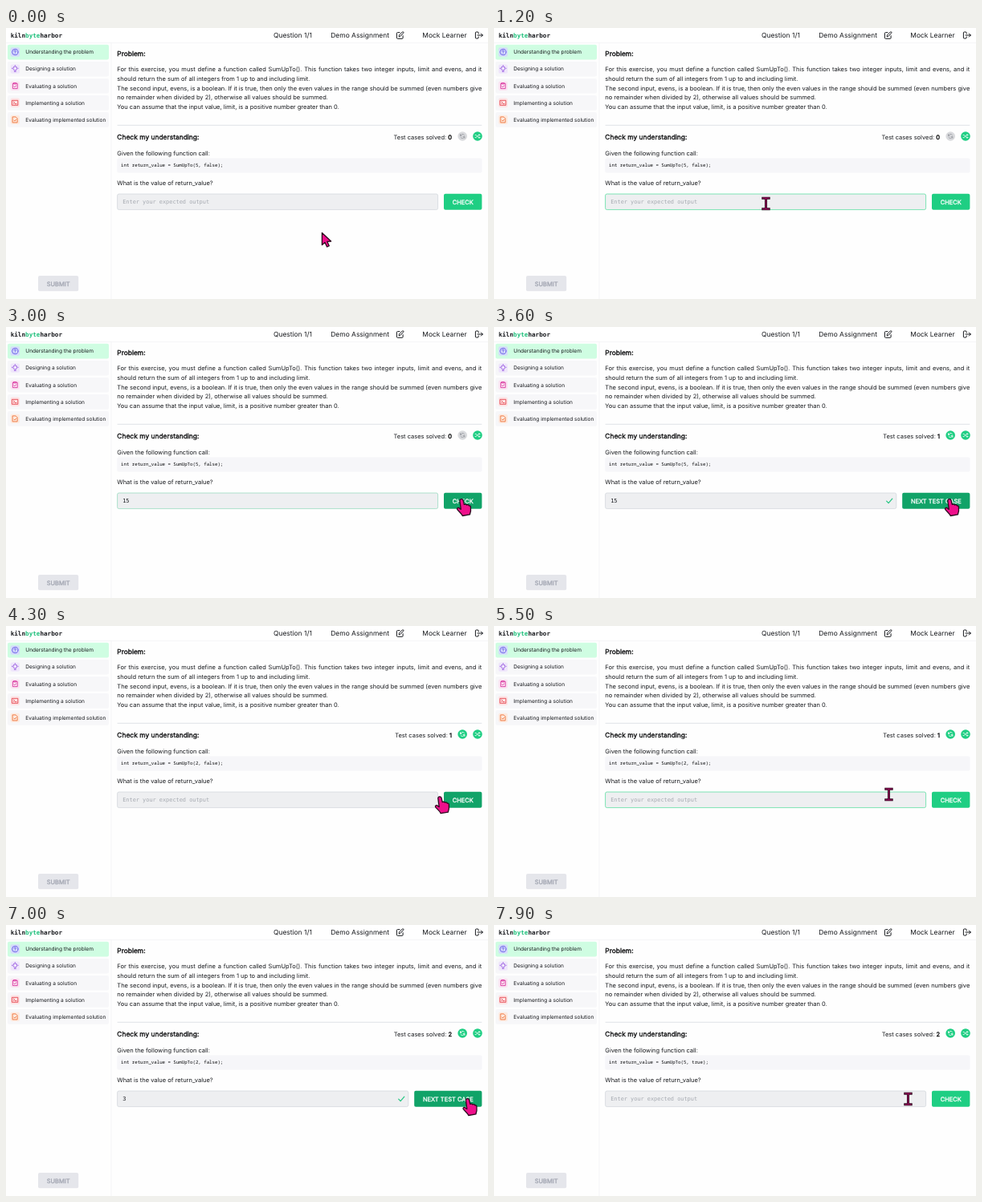
An HTML page for the animation above (8000 ms loop, 600 px wide and 338 px high).

```html
<!DOCTYPE html>
<html lang="en">
<head>
<meta charset="utf-8">
<title>Check my understanding</title>
<style>
  html, body { margin: 0; width: 100%; height: 100%; overflow: hidden; background: #fff; }
  svg { display: block; width: 100vw; height: 100vh; }
  text { font-family: Inter, sans-serif; font-size: 7.5px; fill: #17191d; text-rendering: geometricPrecision; white-space: pre; }
  .top { font-size: 8.44px; }
  .side { font-size: 6.56px; }
  .bold { stroke: currentColor; stroke-width: .32px; }
  .head { font-size: 8.44px; }
  .logo, .field { font-family: "DejaVu Sans Mono", monospace; }
  .logo { font-size: 7.64px; font-weight: 700; fill: #17191d; }
  .code { font-family: "Noto Sans Mono", monospace; font-size: 5.74px; font-weight: 500; fill: #08090b; }
  .field { font-size: 6.9px; }
  .btn { fill: #fff; color: #fff; text-anchor: middle; }
  .icon { fill: none; stroke-linecap: round; stroke-linejoin: round; }
  .cursor { stroke: #2b0a1d; stroke-linejoin: round; fill: #ee0f8b; stroke-width: 1.3px; }
</style>
</head>
<body>
<svg viewBox="0 0 600 338" preserveAspectRatio="none">
  <rect width="600" height="338" fill="#fefefe"/>
  <rect width="600" height="18.3" fill="#fff"/>
  <path d="M0 18.5H600M131 18.5V338" stroke="#efeff2" stroke-width=".6"/>

  <text class="logo" x="5.7" y="12">kiln<tspan fill="#1fc07c">byte</tspan>harbor</text>
  <text class="top" x="333" y="12.1">Question 1/1</text>
  <text class="top" x="404.3" y="12.1">Demo Assignment</text>
  <text class="top" x="518.3" y="12.1">Mock Learner</text>
  <g class="icon" stroke="#17191d" stroke-width="1">
    <path d="M490 5.6H487.4Q486.4 5.6 486.4 6.6V12.3Q486.4 13.3 487.4 13.3H493.1Q494.1 13.3 494.1 12.3V9.7"/>
    <path d="M489.2 10.6L489.5 8.9L493.3 5Q494.2 4.4 494.8 5.1Q495.3 5.8 494.7 6.4L490.9 10.2Z"/>
    <path d="M588.2 7V6Q588.2 5 587.2 5H585.4Q584.4 5 584.4 6V12Q584.4 13 585.4 13H587.2Q588.2 13 588.2 12V11M587 9H593.4M591.3 6.9L593.4 9L591.3 11.1"/>
  </g>

  <g id="menu"></g>
  <rect x="40" y="309" width="50.2" height="19.3" rx="2" fill="#e5e6eb"/>
  <text class="bold" x="65.1" y="321.5" text-anchor="middle" style="fill:#a0a4b0;color:#a0a4b0">SUBMIT</text>

  <text class="head bold" x="138.3" y="35.3">Problem:</text>
  <g id="story"></g>
  <path d="M138.5 121.3H592.3" stroke="#d9dce1" stroke-width=".8"/>
  <text class="head bold" x="138.3" y="138.9">Check my understanding:</text>
  <text x="555" y="138.5" text-anchor="end">Test cases solved: <tspan id="count" class="bold"></tspan></text>

  <circle id="redo" cx="568.2" cy="135" r="5.8"/>
  <g id="redoIcon" class="icon" stroke-width=".8">
    <path d="M565.7 134.3A2.7 2.7 0 0 1 570.5 133.6M570.7 135.7A2.7 2.7 0 0 1 565.9 136.4"/>
    <path d="M565.5 132.6V134.4H567.2M570.9 137.4V135.6H569.2"/>
  </g>
  <circle cx="587" cy="135" r="5.8" fill="#1fce83"/>
  <path class="icon" stroke="#fff" stroke-width=".75" d="M584 133.4H585.2L588 136.6H589.8M584 136.6H585.2L588 133.4H589.8M589 132.5L589.9 133.4L589 134.3M589 135.7L589.9 136.6L589 137.5"/>

  <text x="138.3" y="159">Given the following function call:</text>
  <rect x="138.3" y="162.4" width="454.2" height="18" rx="1.5" fill="#f6f6f9"/>
  <text id="code" class="code" x="143" y="173.2"></text>
  <text x="138.3" y="196.3">What is the value of return_value?</text>

  <rect id="box" x="138.6" y="207" width="399" height="19.6" rx="2" fill="#eeeff1" stroke-width=".8"/>
  <text id="field" class="field" x="145.2" y="219.3"></text>
  <path id="caret" d="M145.6 212.3V220.9" stroke="#17191d" stroke-width=".6"/>
  <path id="tick" class="icon" d="M488.7 217.2L491.1 219.6L495.8 214.2" stroke="#22c581" stroke-width="1.2"/>
  <rect id="button" y="206.8" height="20" rx="2"/>
  <text id="label" class="btn bold" y="219.5"></text>

  <g id="cursor">
    <path id="arrow" class="cursor" d="M.4 .5V15.6L4 12.4L6.6 18L9.3 16.7L6.8 11.3L11.6 11Z"/>
    <path id="hand" class="cursor" d="M-2.6 1.8C-3-.6 .9-1.3 1.6 1.2L2.8 6.4C4.5 5.6 5.8 6.2 6 7C7.6 6.3 8.6 7 8.9 8C10 7.6 10.8 8.3 10.9 9.3L11 14C11 16 10 17 10 18.8L.8 20.5C0 18-3.5 15.5-5.8 12.6C-6.6 11-4.5 9.6-3 11L-1.2 12.4Z"/>
    <g id="beam" fill="none">
      <path d="M-5.2-6.8H5.2M-5.2 6.8H5.2M0-6.8V6.8" stroke="#2b0a1d" stroke-width="3"/>
      <path d="M-4.2-6.8H4.2M-4.2 6.8H4.2M0-6.8V6.8" stroke="#a00c60" stroke-width="1.2"/>
    </g>
  </g>
</svg>
<script>
const LOOP = 8000, STEP = 100;
const $ = id => document.getElementById(id);
const set = (id, attrs) => { for (const k in attrs) $(id).setAttribute(k, attrs[k]); };
const show = (id, on) => set(id, { visibility: on ? 'visible' : 'hidden' });
const put = (id, text) => { if ($(id).textContent !== text) $(id).textContent = text; };
const clamp = v => Math.max(0, Math.min(1, v));
const ease = v => v * v * (3 - 2 * v);
const mix = (a, b, k) => `rgb(${a.map((v, i) => Math.round(v + (b[i] - v) * k))})`;
const between = (t, a, b) => t >= a && t < b;
// rises at a, falls at b, each over d ms
const pulse = (t, a, b, d) => clamp((t - a) / d) - clamp((t - b) / d);

const menu = [
  ['Understanding the problem', '#5b50e6', '#d6dcfb',
    'M15 30A3.7 3.7 0 1 1 7.6 30A3.7 3.7 0 1 1 15 30M10.1 29.1Q10.2 27.9 11.3 27.9Q12.5 28 12.4 29.1Q12.3 29.8 11.3 30.4M11.3 31.9V32'],
  ['Designing a solution', '#8b45dc', '#efe6fb',
    'M10.2 31.6Q8.9 30.6 8.9 29.2A2.4 2.4 0 0 1 13.7 29.2Q13.7 30.6 12.4 31.6ZM10.3 33.2H12.3M11.3 25.5V25.7M7.4 29.2H7.6M15 29.2H15.2'],
  ['Evaluating a solution', '#d92f9b', '#fbe3f2',
    'M9.9 27H8.4V33.4H14.2V27H12.7M9.9 26.3H12.7V27.7H9.9ZM9.9 30.7L10.9 31.6L12.7 29.6'],
  ['Implementing a solution', '#e43a45', '#fde4e5',
    'M7.8 27H14.8V33H7.8ZM9.3 28.6L10.7 29.9L9.3 31.2M11.4 31.3H13'],
  ['Evaluating implemented solution', '#ee6a2c', '#fdeadf',
    'M8.5 26.5H12.2L14.1 28.4V33.5H8.5ZM9.9 30.7L10.9 31.7L12.7 29.7']
];
$('menu').innerHTML = menu.map(([name, ink, tint, path], i) => `
  <g transform="translate(0 ${i * 21.1})">
    <rect x="2" y="20.7" width="126" height="18.7" rx="2" fill="${i ? '#f7f7f9' : '#cffde2'}"/>
    <rect x="5.6" y="24.3" width="11.4" height="11.4" rx="2" fill="${tint}"/>
    <path class="icon" d="${path}" stroke="${ink}" stroke-width=".85"/>
    <text class="side" x="24.3" y="32.4">${name}</text>
  </g>`).join('');

const story = [
  'For this exercise, you must define a function called SumUpTo(). This function takes two integer inputs, limit and evens, and it',
  'should return the sum of all integers from 1 up to and including limit.',
  'The second input, evens, is a boolean. If it is true, then only the even values in the range should be summed (even numbers give',
  'no remainder when divided by 2), otherwise all values should be summed.',
  'You can assume that the input value, limit, is a positive number greater than 0.'
];
$('story').innerHTML = story.map((line, i) =>
  `<text x="138.3" y="${54.1 + i * 11.75}">${line}</text>`).join('');

function justify() {
  for (const i of [0, 2]) {
    const el = $('story').children[i];
    el.style.wordSpacing = '0px';
    const gaps = story[i].split(' ').length - 1;
    el.style.wordSpacing = (454 - el.getComputedTextLength()) / gaps + 'px';
  }
}
justify();
document.fonts.ready.then(justify);

// start, end, target x, target y
const start = [393, 255];
const moves = [
  [50, 650, 338.5, 219],
  [1200, 1300, 358, 219],
  [1950, 2750, 567.5, 215],
  [4030, 4700, 491.5, 210],
  [5850, 6450, 575, 217],
  [7500, 7900, 515.5, 217]
];
function pointer(t) {
  let [x, y] = start;
  for (const [a, b, tx, ty] of moves) {
    const k = ease(clamp((t - a) / (b - a)));
    x += (tx - x) * k;
    y += (ty - y) * k;
  }
  return [x, y];
}

// time, typed text, test cases solved, call arguments, answer accepted
const states = [
  [0, '', 0, '5, false', false],
  [1500, '1', 0, '5, false', false],
  [1600, '15', 0, '5, false', false],
  [3200, '15', 1, '5, false', true],
  [3800, '', 1, '2, false', false],
  [5900, '3', 1, '2, false', false],
  [6700, '3', 2, '2, false', true],
  [7300, '', 2, '5, true', false]
];
const blinks = [700, 1500, 1600, 5000, 5900];

function draw(t) {
  const [, typed, solved, args, done] = states.filter(s => s[0] <= t).pop();
  put('count', String(solved));
  put('code', `int return_value = SumUpTo(${args});`);
  put('field', typed || 'Enter your expected output');
  $('field').style.fill = typed ? '#17191d' : '#a5a9b0';
  put('label', done ? 'NEXT TEST CASE' : 'CHECK');

  const left = done ? 508.2 : 545;
  set('button', { x: left, width: 592.4 - left });
  set('label', { x: (left + 592.4) / 2 });
  set('box', { width: left - 7.4 - 138.6 });
  show('tick', done);

  const focus = pulse(t, 600, 2900, 200) + pulse(t, 4900, 6400, 200);
  set('box', { stroke: mix([212, 216, 221], [95, 221, 163], focus) });
  const hover = pulse(t, 2400, 4300, 150) + pulse(t, 6100, 7600, 150);
  set('button', { fill: mix([31, 206, 131], [17, 163, 104], hover) });

  const focused = between(t, 700, 2900) || between(t, 5000, 6500);
  const last = blinks.filter(b => b <= t).pop();
  show('caret', focused && (t - last) % 1000 < 500);
  set('caret', { transform: `translate(${typed.length * 4.15} 0)` });

  set('redo', { fill: solved ? '#1fce83' : '#d9dadd' });
  set('redoIcon', { stroke: solved ? '#fff' : '#96999f' });

  const [x, y] = pointer(t);
  const inBox = x < left - 7.4 && between(y, 207, 227);
  const kind = inBox ? 'beam' : y < 230 ? 'hand' : 'arrow';
  for (const id of ['arrow', 'hand', 'beam']) show(id, id === kind);
  set('cursor', { transform: `translate(${x.toFixed(2)} ${y.toFixed(2)})` });
}

let origin;
function tick(now) {
  origin ??= now;
  draw(Math.floor((now - origin) % LOOP / STEP) * STEP);
  requestAnimationFrame(tick);
}
draw(0);
requestAnimationFrame(tick);
</script>
</body>
</html>
```
